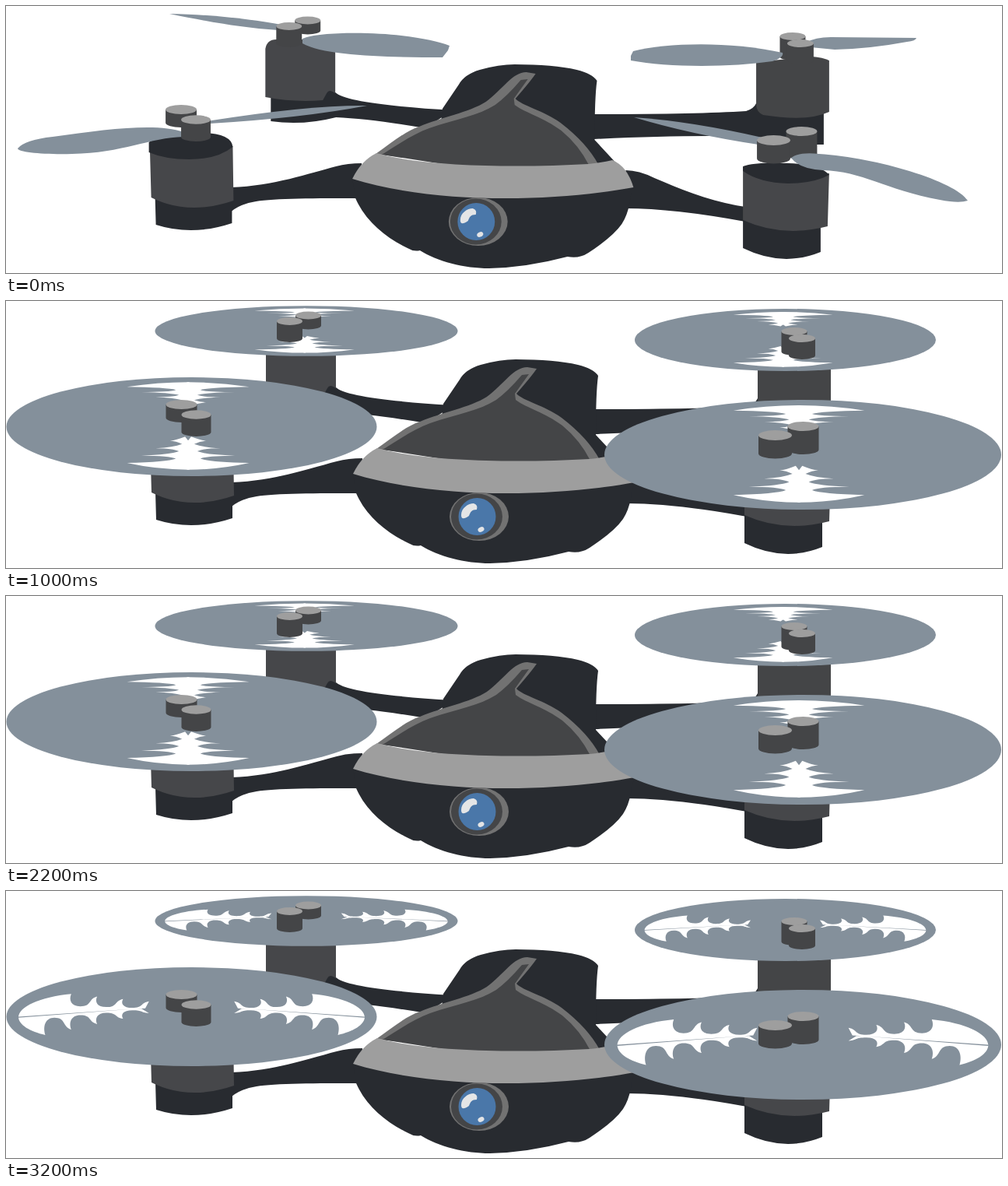
Animation, 1280 px wide and 343 px high, one loop 3400 ms. Source, as an HTML page:

```html
<!DOCTYPE html>
<html lang="en">
<head>
<meta charset="utf-8">
<title>Drone</title>
<style>
  html, body { margin: 0; width: 100%; height: 100%; overflow: hidden; background: #fff; }
  svg { display: block; width: 1280px; height: 343px; }
  .dark { fill: #282b30; }
  .motor { fill: #46474a; }
  .shade { fill: #444547; }
  .rim { fill: #727272; }
  .light { fill: #9e9e9e; }
  .blade { fill: #84909b; }
  .streak { fill: #fff; }
</style>
</head>
<body>
<svg viewBox="0 0 1280 343">
  <g class="frame">
    <!-- arms, tail and belly -->
    <g class="dark">
      <path d="M341 115V148Q382 154 425 143Q470 145 540 157L575 134Q440 126 424 111L416 107Z"/>
      <path d="M757 139Q890 139 953 135Q963 132 966 125L1053 130V178H1040L966 168Q880 165 757 171Z"/>
      <path d="M562 132L583 101Q590 88 610 82Q635 75 655 75Q705 75 735 82Q755 87 761 96Q758 117 758 172L784 200L640 215L560 150Z"/>
      <path d="M290 233C345 231 390 215 425 206Q440 202 458 202L455 247C400 247 345 247 322 251Q302 254 290 264Z"/>
      <path d="M798 211Q815 211 835 221C870 236 910 252 952 258V277Q860 260 798 260Z"/>
      <path d="M446 222L450 247C463 277 490 298 517 311Q525 316 533 314C555 328 590 337 622 337Q670 336 723 322Q738 325 750 317Q782 296 793 280Q802 266 804 246L808 233L640 200Z"/>
    </g>
    <!-- motors -->
    <path class="motor" d="M334 55Q336 43 348 43H424V112Q416 106 413 112L408 121Q370 124 334 117Z"/>
    <path class="shade" d="M966 72L1038 65Q1052 66 1060 70V136Q1032 149 975 140Q966 136 966 126Z"/>
    <path class="dark" d="M192 245L193 281Q240 296 291 279V245ZM949 265V311Q1000 336 1049 316V270Z"/>
    <path class="motor" d="M185 174L187 246Q235 270 293 250L292 180ZM949 207V275Q1000 298 1058 283L1060 215Z"/>
    <path class="dark" d="M184 175Q200 163 245 163Q290 162 292 181Q272 197 236 197Q205 197 184 188ZM949 206Q965 200 1008 202Q1050 204 1060 217Q1040 228 1007 228Q970 227 949 212Z"/>
    <!-- canopy -->
    <path class="rim" d="M476 190C495 177 515 160 532 155C560 143 596 137 618 123C640 107 652 85 670 85L682 87Q676 96 656 119C664 128 692 134 714 150Q748 176 763 204L650 212Z"/>
    <path class="shade" d="M484 191C505 178 525 164 545 157C580 145 608 141 630 127Q645 116 663 95L672 94L654 119L655 127C670 138 692 143 715 160Q738 179 751 205L620 212Z"/>
    <path class="light" d="M446 222Q457 199 477 189C540 207 660 208 750 203Q768 201 781 198Q800 206 808 233C715 250 560 257 446 222Z"/>
    <!-- camera -->
    <ellipse class="rim" cx="608" cy="277" rx="38" ry="31"/>
    <ellipse class="shade" cx="605" cy="277" rx="33" ry="29.5"/>
    <circle cx="605.5" cy="277" r="24" fill="#4a77a9"/>
    <g fill="#e4e5e6">
      <path d="M585 275C585 266 594 260 601 260Q607 262 605 268C598 268 597 271 595 276Q585 283 585 275Z"/>
      <ellipse cx="610.5" cy="293.5" rx="4.2" ry="3" transform="rotate(-25 610.5 293.5)"/>
    </g>
  </g>

  <g class="blade still">
    <path d="M210 10C270 11 320 18 354 24L350 31C300 28 260 20 210 10Z"/>
    <path d="M1028 47Q1040 40 1060 40L1170 41Q1169 45 1158 46Q1110 55 1065 56L1034 53Z"/>
    <path d="M15 183Q24 172 60 168C130 158 195 150 228 162V168C185 169 150 189 85 190C50 191 15 188 15 183Z"/>
    <path d="M258 148Q390 127 464 128Q380 144 262 151Z"/>
    <path d="M807 143Q880 148 972 169L967 178Q880 165 807 143Z"/>
  </g>

  <g id="discs"></g>
  <g id="pins" class="frame"></g>

  <g class="blade still">
    <path d="M381 42C400 33 470 33 508 38Q550 43 570 51L568 57L561 66C500 66 410 65 381 48Z"/>
    <path d="M803 70V64L806 58C850 47 930 45 998 60Q1000 66 985 71C930 79 850 79 803 70Z"/>
    <path d="M1009 195Q1020 187 1045 190C1120 195 1220 225 1236 250Q1225 254 1200 249C1130 236 1100 212 1050 211Q1020 210 1009 195Z"/>
  </g>
</svg>
<script>
const $ = id => document.getElementById(id);
const all = sel => [...document.querySelectorAll(sel)];
const mix = (a, b, t) => a + (b - a) * t;

// disc: cx, cy, rx, ry; pins: x, y, radius, height
const rotors = [
  { disc: [386, 38.5, 194.5, 32.3], pins: [[388.5, 18.5, 16.5, 18], [364.5, 26, 16.5, 27]] },
  { disc: [1001.5, 50, 193.5, 40], pins: [[1013, 39, 16.5, 31], [1023, 48, 17, 27]] },
  { disc: [238.5, 161.5, 238, 63.5], pins: [[225.5, 133, 20, 23], [244.5, 146, 19, 28]] },
  { disc: [1024, 197.5, 255, 70.5], pins: [[1024.5, 161, 20, 36], [988.5, 172.5, 21.5, 30]] }
];

// Row of teeth from one tip to another, with rounded lobes rising to a spine between them
function teeth(count, [x0, y0], [x1, y1], spine0, spine1) {
  const dx = (x1 - x0) / count;
  let path = "";
  for (let i = 0; i < count; i++) {
    const x = x0 + dx * i, y = mix(y0, y1, i / count), next = mix(y0, y1, (i + 1) / count);
    const s = mix(spine0, spine1, i / (count - 1));
    path += `C${x - dx * .1} ${mix(y, s, .5)} ${x} ${s} ${x + dx * .35} ${s}` +
      `C${x + dx * .8} ${s} ${x + dx * .65} ${mix(s, next, .75)} ${x + dx} ${next}`;
  }
  return path;
}

// Feathered crescent in a unit disc, left side; the top row is traced inward on the mirrored path
const topTip = [-.65, -.46], lowTip = [-.79, .37];
const feather =
  `M-.3 -.16L-.935 0C-.935 .17 -.87 .3 ${lowTip}` +
  teeth(4, lowTip, [-.23, -.07], .02, -.13) +
  `L-.27 -.16ZM-.3 -.16L-.935 .02C-.935 -.2 -.82 -.4 ${topTip}` +
  teeth(3, topTip, [-.23, -.31], -.21, -.18) + "L-.25 -.17Z";

// Right half of a comb of thin spikes, from the outer edge (y 0) to the pins (y 1)
function halfComb(n = 4) {
  let path = "M-.02 0H0Q.5 0 1 .22";
  for (let i = 0; i < n; i++) {
    const y = .22 + i * .24, root = .2 * (1 - i / n), x = 1 - (i + 1) * .235;
    path += `Q${root + .14} ${y + .03} ${root} ${y + .14}`;
    if (i < n - 1) path += `Q${root + .1} ${y + .24} ${x} ${y + .24}`;
  }
  return path + "L-.02 .9Z";
}
const comb = halfComb();

const place = (d, x, y, sx, sy) =>
  `<path d="${d}" transform="translate(${x} ${y}) scale(${sx} ${sy})"/>`;
const mirrored = (d, x, y, sx, sy) => place(d, x, y, sx, sy) + place(d, x, y, -sx, sy);

$("discs").innerHTML = rotors.map(({ disc: [cx, cy, rx, ry] }) => {
  const row = (from, to) =>
    mirrored(comb, cx - ry * .07, cy + from * ry, rx * .33, (to - from) * ry);
  return `<ellipse class="blade" cx="${cx}" cy="${cy}" rx="${rx}" ry="${ry}"/>
    <g class="streak sides">${mirrored(feather, cx, cy, rx, ry)}</g>
    <g class="streak ends">${row(-.9, -.47) + row(.87, .25)}</g>`;
}).join("");

$("pins").innerHTML = rotors.flatMap(r => r.pins).map(([x, y, r, h]) => {
  const ry = r * .3;
  return `<path class="shade" d="M${x - r} ${y}v${h - ry}a${r} ${ry} 0 0 0 ${2 * r} 0V${y}Z"/>
    <ellipse class="light" cx="${x}" cy="${y}" rx="${r}" ry="${ry}"/>`;
}).join("");

const show = (els, on) => els.forEach(el => el.style.display = on ? "" : "none");
const still = all(".still"), sides = all(".sides"), ends = all(".ends"), frame = all(".frame");
const start = performance.now();

// one resting step, then the two blur poses alternate
function draw(now) {
  const step = Math.floor(Math.max(0, now - start) % 3400 / 200);
  show(still, step === 0);
  show([$("discs")], step > 0);
  show(ends, step % 2 === 1);
  show(sides, step % 2 === 0);
  frame.forEach(g => g.setAttribute("transform", step ? "" : "scale(.998 1)"));
  requestAnimationFrame(draw);
}
draw(start);
</script>
</body>
</html>
```
